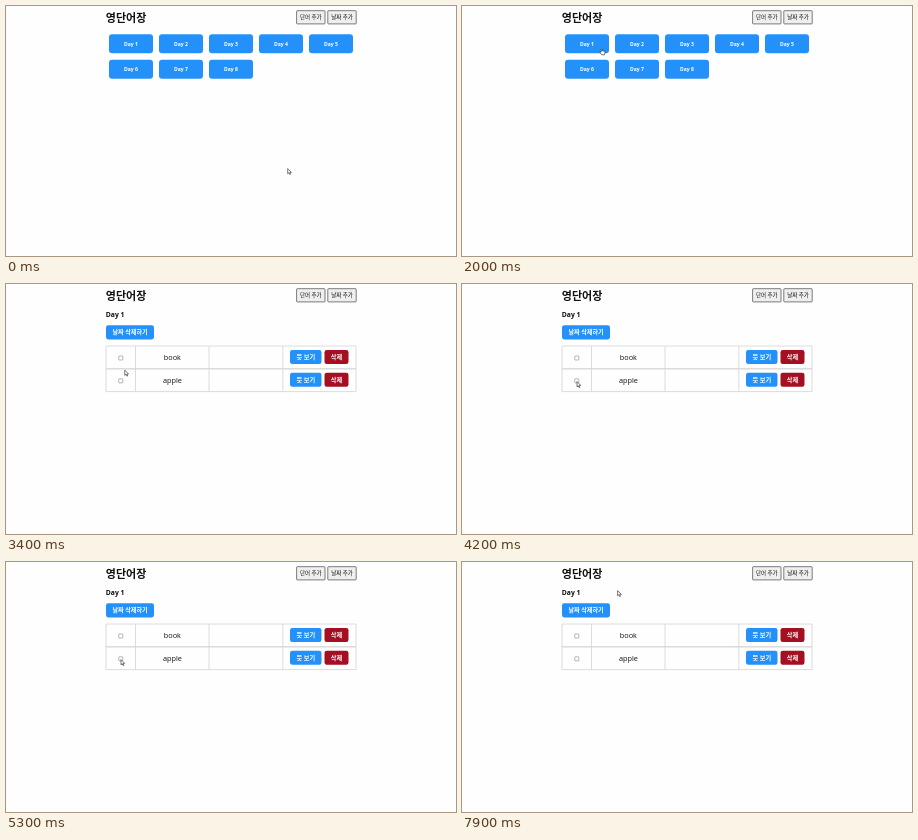
These frames come from a looping animation (450x250 px, 8000 ms). An HTML page:

```html
<!DOCTYPE html>
<html lang="ko">
<head>
<meta charset="utf-8">
<title>영단어장</title>
<style>
  html, body { margin: 0; width: 100%; height: 100%; overflow: hidden; background: #fefefe; }
  svg { display: block; width: 450px; height: 250px; }
  text { font-family: "Open Sans", "Noto Sans CJK KR", "Noto Sans CJK", sans-serif; fill: #111; }
  .bold { font-weight: 700; }
  .mid { text-anchor: middle; }
  .light { fill: #fff; }
  .tool { fill: #efefef; stroke: #5c5c5c; stroke-width: .8; }
  .blue { fill: #2491fb; }
  .red { fill: #a50f22; }
  .line { fill: none; stroke: #d4d4d4; stroke-width: .8; }
  .box { fill: #fff; stroke: #858585; stroke-width: .6; }
  .tick { fill: none; stroke: #fff; stroke-width: .7; visibility: hidden; }
  .shade { fill: none; }
  .off .shade { fill: #eee; }
  .off .word { fill: #ccc; }
  .off .box { fill: #1a73e8; stroke: #1a73e8; }
  .off .tick { visibility: visible; }
  .cursor { fill: #fff; stroke: #222; stroke-width: .6; stroke-linejoin: round; }
</style>
</head>
<body>
<svg id="stage" viewBox="0 0 450 250"></svg>
<script>
const LOOP = 8000, STEP = 100;

const text = (x, y, size, label, cls = '') =>
  `<text x="${x}" y="${y}" font-size="${size}" class="${cls}">${label}</text>`;

const rect = (x, y, w, h, cls, r = 0) =>
  `<rect x="${x}" y="${y}" width="${w}" height="${h}" rx="${r}" class="${cls}"/>`;

const button = (x, y, w, h, label, color, size = 6.2, r = 2.3) =>
  rect(x, y, w, h, color, r) +
  text(x + w / 2, y + h / 2 + size * .36, size, label, 'bold mid light');

const tool = (x, label) =>
  rect(x, 4.7, 28.4, 13.2, 'tool', .6) + text(x + 14.2, 13.3, 5.5, label, 'mid');

const group = (id, body) => `<g id="${id}">${body}</g>`;

const tile = i =>
  button(103 + i % 5 * 50, 28.2 + Math.floor(i / 5) * 25.5, 44, 19, `Day ${i + 1}`, 'blue', 5.1, 3);

const closed = y =>
  button(284, y + 4, 31.5, 14, '뜻 보기', 'blue') +
  button(318.5, y + 4, 24, 14, '삭제', 'red');

const opened = (y, meaning) =>
  text(239.8, y + 14.8, 8, meaning, 'mid word') +
  button(281, y + 4, 37.6, 14, '뜻 숨기기', 'blue') +
  button(321.2, y + 4, 24, 14, '삭제', 'red');

const row = (id, y, word, meaning) => group(id,
  rect(100, y, 250, 22.8, 'shade') +
  rect(112.8, y + 10, 4, 4, 'box', .5) +
  `<path class="tick" d="M113.6 ${y + 12}l.9 .9 1.6-1.9"/>` +
  text(166.4, y + 14.2, 7.3, word, 'mid word') +
  group(id + 'Closed', closed(y)) +
  group(id + 'Opened', opened(y, meaning)) +
  `<path class="line" d="M100 ${y}h250v22.8h-250zM129.5 ${y}v22.8M203 ${y}v22.8M276.8 ${y}v22.8"/>`);

const stage = document.getElementById('stage');
stage.innerHTML =
  text(99.8, 15.8, 11, '영단어장', 'bold') +
  tool(290.6, '단어 추가') + tool(321.8, '날짜 추가') +
  group('home', Array.from({ length: 8 }, (_, i) => tile(i)).join('')) +
  group('day',
    text(99.8, 33, 6.8, 'Day 1', 'bold') +
    button(100, 41.2, 48, 14.2, '날짜 삭제하기', 'blue', 6.1) +
    row('book', 62, 'book', '책') +
    row('apple', 84.8, 'apple', '사과')) +
  group('cursor',
    '<path id="arrow" class="cursor" d="M0 0v5.2l1.2-1.1.9 1.9.8-.4-.8-1.8h1.6z"/>' +
    '<path id="hand" class="cursor" d="M1.3 3.4V.7q.6-.8 1.1 0v1.8l2 .5q.7.3.6 1l-.5 2.5h-2.8l-1.6-2.2q0-.9 1.2-.9z"/>');

// Pointer stops: time, x, y
const path = [
  [0, 281.7, 162.6], [200, 281.7, 162.6], [900, 166, 60], [1600, 138, 42.3],
  [2700, 138, 42.3], [3600, 116, 92.5], [3800, 115, 97.6], [5400, 115, 97.6],
  [5800, 215, 109.5], [6100, 297, 98], [7200, 297, 98], [7800, 155.6, 28.6], [8000, 155.6, 28.6]
];

const within = (t, from, to) => t >= from && t < to;

function pointer(t) {
  const i = path.findIndex(p => p[0] > t);
  const [t0, x0, y0] = path[i - 1], [t1, x1, y1] = path[i];
  const k = (t - t0) / (t1 - t0), e = k * k * (3 - 2 * k);
  return [x0 + (x1 - x0) * e, y0 + (y1 - y0) * e];
}

const get = id => document.getElementById(id);
const show = (id, on) => { get(id).style.display = on ? '' : 'none'; };

function draw() {
  const t = Math.floor(performance.now() % LOOP / STEP) * STEP;
  const onDay = t >= 2200;
  const meaning = within(t, 6200, 7000);
  const link = within(t, 900, 2900) || within(t, 6100, 7300);
  show('home', !onDay);
  show('day', onDay);
  show('bookOpened', false);
  show('appleOpened', meaning);
  show('appleClosed', !meaning);
  get('apple').classList.toggle('off', within(t, 4400, 4900));
  show('hand', link);
  show('arrow', !link);
  get('cursor').setAttribute('transform', `translate(${pointer(t)})`);
  requestAnimationFrame(draw);
}
draw();
</script>
</body>
</html>
```
